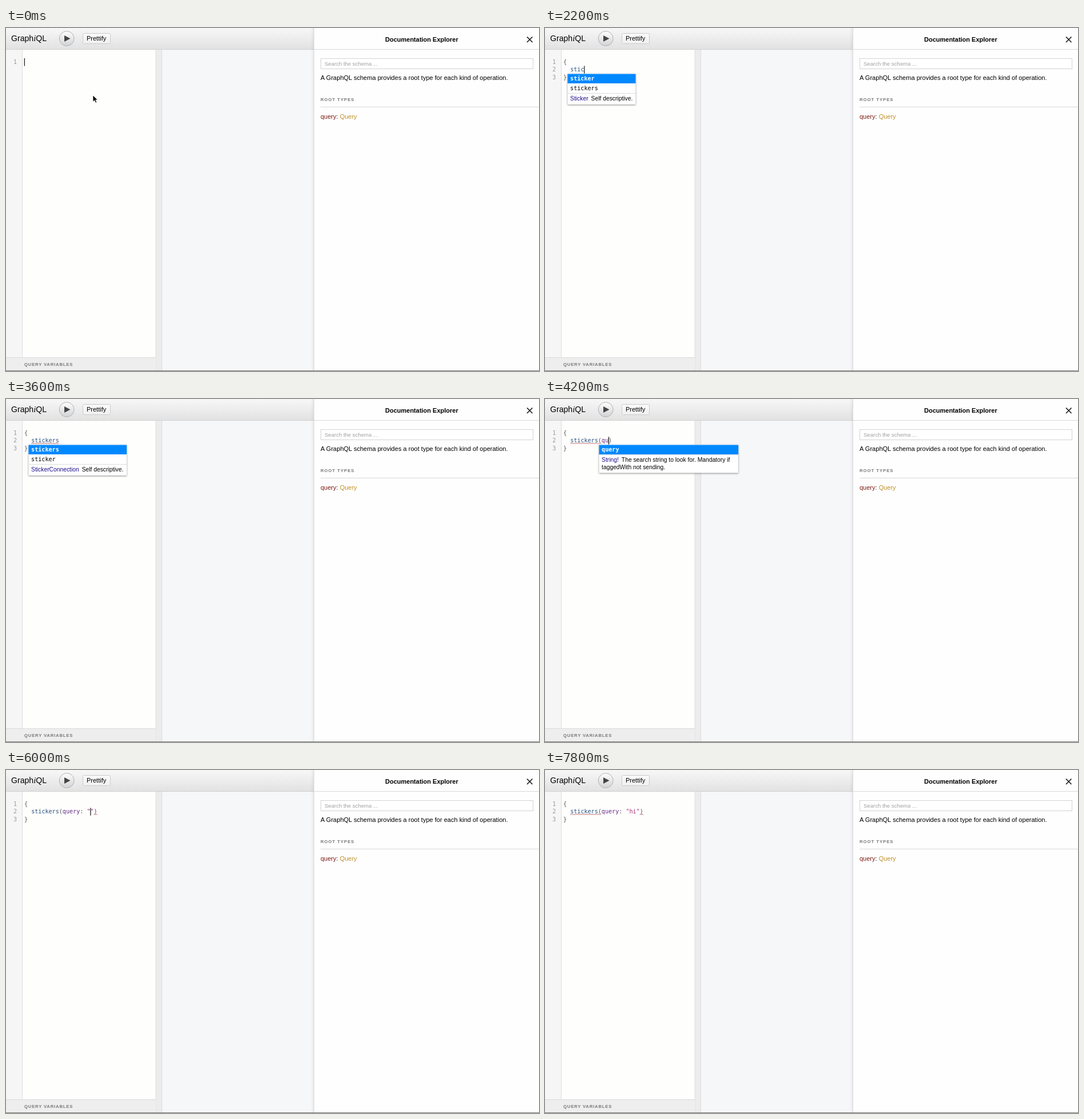
An HTML page that plays this animation: 932x601 px, repeating every 8 s.

```html
<!DOCTYPE html>
<html lang="en">
<head>
<meta charset="utf-8">
<title>GraphiQL</title>
<style>
  html, body { margin: 0; width: 100%; height: 100%; overflow: hidden; background: #fefefe; }
  svg { display: block; width: 932px; height: 601px; }
  text { font: 11px "Liberation Sans", Arial, sans-serif; white-space: pre; }
  .mono { font: 10.1px "DejaVu Sans Mono", monospace; }
  .logo { font-size: 14.1px; }
  .logo tspan { font: italic 15px "Liberation Serif", serif; }
  .bold { font-weight: bold; }
  .caps { font-size: 7.7px; font-weight: bold; fill: #777; }
  .info { font-size: 10.3px; }
  .number { fill: #999; text-anchor: end; }
  .punct { fill: #555; }
  .field { fill: #27507f; }
  .arg { fill: #672a86; }
  .string { fill: #a8347a; }
  .type { fill: #1c0c8a; }
  .lint { fill: none; stroke: #b03838; stroke-width: .8; }
  .panel { filter: drop-shadow(0 0 3px rgba(0, 0, 0, .18)); }
  .popup { filter: drop-shadow(0 1px 1.5px rgba(0, 0, 0, .45)); }
</style>
</head>
<body>
<svg viewBox="0 0 932 601">
  <defs>
    <linearGradient id="bar" x2="0" y2="1">
      <stop stop-color="#f7f7f7"/><stop offset="1" stop-color="#e2e2e2"/>
    </linearGradient>
    <linearGradient id="knob" x2="0" y2="1">
      <stop stop-color="#fdfdfd"/><stop offset="1" stop-color="#d2d3d6"/>
    </linearGradient>
    <linearGradient id="key" x2="0" y2="1">
      <stop stop-color="#fafafa"/><stop offset="1" stop-color="#f0f0f0"/>
    </linearGradient>
  </defs>

  <rect width="932" height="601" fill="#fefefd"/>
  <rect y="38" width="28" height="539" fill="#f6f6f6"/>
  <path d="M28.5 38V577" stroke="#ddd"/>
  <rect x="262" y="38" width="11" height="563" fill="#ececec"/>
  <path d="M262 38V601M272.5 38V601" stroke="#dedede"/>
  <rect x="273" y="38" width="266" height="563" fill="#f6f7f9"/>
  <rect y="577" width="262" height="24" fill="#eee"/>
  <path d="M0 577.5H262" stroke="#dadada"/>
  <text class="caps" x="32" y="592" letter-spacing=".82">QUERY VARIABLES</text>

  <rect width="539" height="37" fill="url(#bar)"/>
  <path d="M0 37.5H539" stroke="#d0d0d0"/>
  <text class="logo" x="9" y="23">Graph<tspan>i</tspan>QL</text>
  <circle cx="106.2" cy="18.5" r="12.9" fill="url(#knob)" stroke="#b0b0b0"/>
  <path d="M102 13L112.5 18.5L102 24Z" fill="#444"/>
  <rect x="134.5" y="9.5" width="48" height="18" rx="2" fill="url(#key)" stroke="#cbcbcb"/>
  <text x="141" y="22">Prettify</text>

  <rect class="panel" x="539" y="-5" width="400" height="615" fill="#fefefe"/>
  <path d="M538.5 0V601" stroke="#dedede"/>
  <path d="M539 37.5H932M550 138.5H932" stroke="#d9d9d9"/>
  <text class="bold" x="663" y="23.5">Documentation Explorer</text>
  <path d="M911 15.5l9.5 9.5m0 -9.5l-9.5 9.5" stroke="#111" stroke-width="1.5"/>
  <rect x="550.5" y="53.5" width="371" height="18" fill="#fff" stroke="#d3d3d3"/>
  <text x="557" y="65.5" fill="#a0a0a0" style="font-size:9.55px">Search the schema ...</text>
  <text x="550" y="91" style="font-size:11.05px">A GraphQL schema provides a root type for each kind of operation.</text>
  <text class="caps" x="550" y="128" letter-spacing=".98">ROOT TYPES</text>
  <text x="550" y="158.5" fill="#7b1a12">query<tspan fill="#222">: </tspan><tspan fill="#c0902a">Query</tspan></text>

  <g id="editor"></g>
  <path d="M0 600.5H932" stroke="#777"/>
</svg>

<script>
const LOOP = 8000, LEFT = 32, CHAR = 6.08;
const editor = document.getElementById("editor");
const colX = col => LEFT + col * CHAR;
const baseline = row => 63 + row * 13.3;

const popups = {
  one: { x: 39.5, width: 119, items: ["sticker", "stickers"], type: "Sticker", info: ["Self descriptive."] },
  many: { x: 39.5, width: 171.5, items: ["stickers", "sticker"], type: "StickerConnection", info: ["Self descriptive."] },
  query: { x: 94.5, width: 243.5, items: ["query"], type: "String!",
    info: ["The search string to look for. Mandatory if", "taggedWith not sending."] }
};

// "|" marks the caret, "~" a hidden caret; lint lists [first column, length]
const name = [2, 8], call = [2, 9];
const steps = [
  { at: 0, code: "|", pointer: true },
  { at: 600, code: "~", pointer: true },
  { at: 1000, code: "{|}" },
  { at: 1400, code: "{\n  |\n}" },
  { at: 1800, line: "s|" },
  { at: 2000, line: "st|", popup: "one" },
  { at: 2200, line: "stic|", popup: "one" },
  { at: 2400, line: "stick|", popup: "one" },
  { at: 2600, line: "sticke|", popup: "one" },
  { at: 2800, line: "sticker|", popup: "one" },
  { at: 3200, line: "stickers|", popup: "many" },
  { at: 3600, line: "stickers~", popup: "many", lint: [name] },
  { at: 3800, line: "stickers|", lint: [name] },
  { at: 4000, line: "stickers(|)", lint: [call] },
  { at: 4200, line: "stickers(qu|)", popup: "query", lint: [call] },
  { at: 4400, line: "stickers(quer|)", popup: "query", lint: [call] },
  { at: 4600, line: "stickers(query|)", popup: "query", lint: [call] },
  { at: 4800, line: "stickers(query|)", lint: [call] },
  { at: 5000, line: "stickers(query:|)", lint: [call] },
  { at: 5200, line: "stickers(query: |)", lint: [call] },
  { at: 5600, line: 'stickers(query: "|")' },
  { at: 5800, line: 'stickers(query: "|")', lint: [[20, 1]] },
  { at: 6400, line: 'stickers(query: "h|")', lint: [[21, 1]] },
  { at: 6600, line: 'stickers(query: "hi|")', lint: [[22, 1]] },
  { at: 7200, line: 'stickers(query: "hi~")', lint: [call, [22, 1]] },
  { at: 7400, line: 'stickers(query: "hi|")', lint: [call, [22, 1]] },
  { at: 7800, line: 'stickers(query: "hi~")', lint: [call, [22, 1]] }
];

const text = (x, y, cls, body, extra = "") => `<text x="${x}" y="${y}" class="${cls}" ${extra}>${body}</text>`;

function highlight(line) {
  return line.replace(/"\w*"|\w+|[^\w"\s]+/g, (token, index) => {
    const kind = token[0] === '"' ? "string" : !/\w/.test(token) ? "punct" : index < 3 ? "field" : "arg";
    return `<tspan class="${kind}">${token}</tspan>`;
  });
}

function drawLine(line, row) {
  const caret = line.search(/[|~]/), y = baseline(row);
  let out = text(19, y, "mono number", row + 1) + text(LEFT, y, "mono", highlight(line.replace(/[|~]/, "")));
  if (line[caret] === "|") {
    out += `<rect x="${colX(caret) - .2}" y="${y - 10}" width="1.1" height="13.5"/>`;
  }
  return out;
}

function drawLint([col, length]) {
  const waves = Math.round(length * CHAR / 3);
  return `<path class="lint" d="M${colX(col)} 78.6${"l1.5 -1.5l1.5 1.5".repeat(waves)}"/>`;
}

function drawPopup({ x, width, items, type, info }) {
  const listHeight = items.length * 17, infoY = 93 + listHeight;
  const height = listHeight + 7.5 + info.length * 12.5;
  const left = x + 4.6;
  return `<rect class="popup" x="${x}" y="80" width="${width}" height="${height}" fill="#fff"/>` +
    `<rect x="${x}" y="80.5" width="${width}" height="16.5" fill="#08f"/>` +
    `<path d="M${x} ${80.5 + listHeight}h${width}" stroke="#ddd"/>` +
    items.map((item, i) => text(left, 92 + i * 17, i ? "mono" : "mono bold", item, i ? "" : 'fill="#fff"')).join("") +
    text(left, infoY, "info", `<tspan class="type">${type}</tspan><tspan dx="5">${info[0]}</tspan>`) +
    info.slice(1).map((row, i) => text(left, infoY + 12.5 * (i + 1), "info", row)).join("");
}

const pointer = '<path d="M152 118v11.2l2.7 -2.5l2.1 4.4l1.9 -.9l-2 -4.2h3.6z" stroke="#fff" stroke-width=".7"/>';

function draw(step) {
  const code = step.code ?? `{\n  ${step.line}\n}`;
  editor.innerHTML = code.split("\n").map(drawLine).join("") +
    (step.lint || []).map(drawLint).join("") +
    (step.popup ? drawPopup(popups[step.popup]) : "") +
    (step.pointer ? pointer : "");
}

let shown;
const start = performance.now();
function tick(now) {
  const time = Math.max(0, now - start) % LOOP;
  const step = steps.findLast(s => s.at <= time);
  if (step !== shown) draw(shown = step);
  requestAnimationFrame(tick);
}
tick(start);
</script>
</body>
</html>
```
